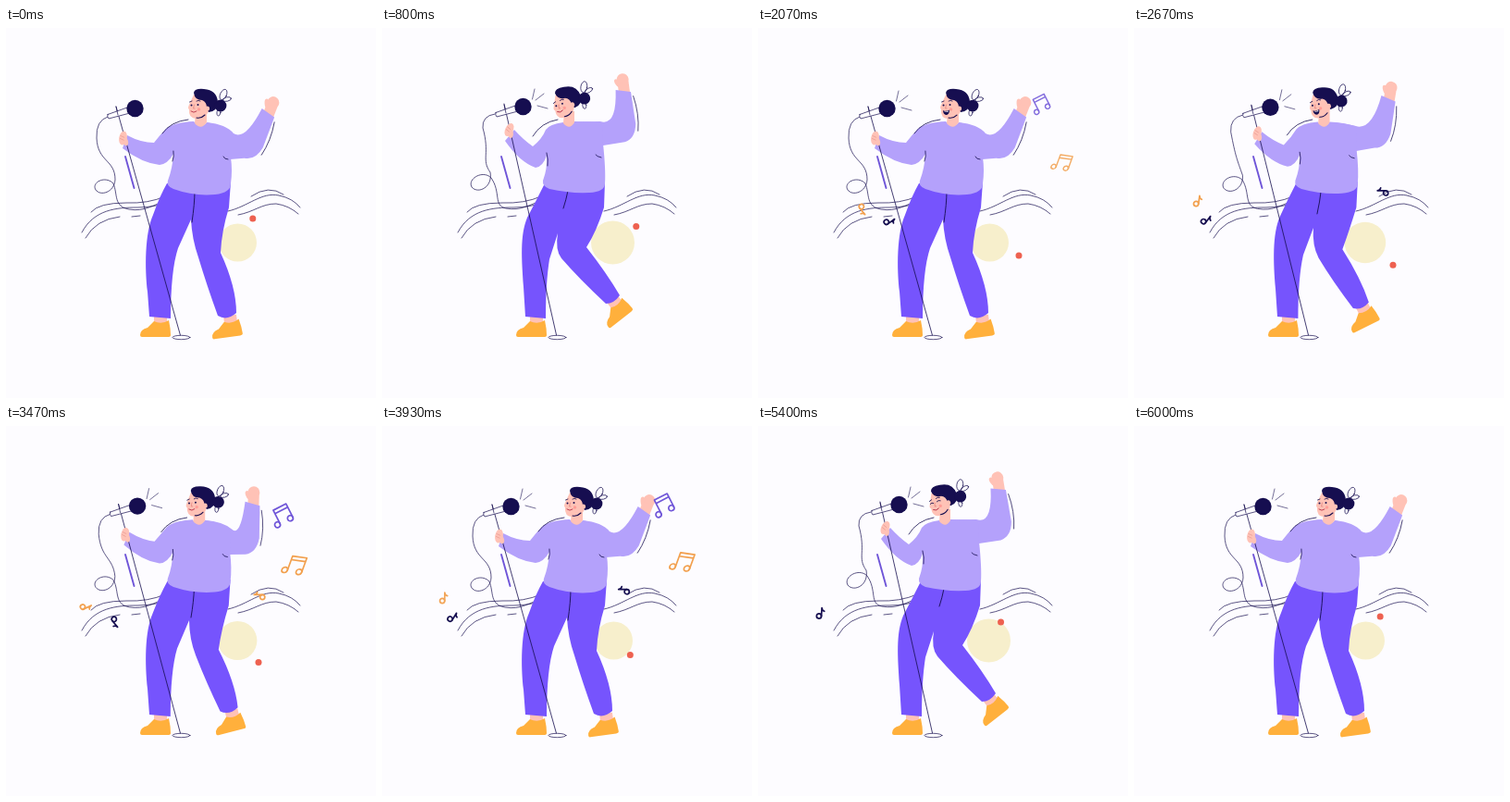
An HTML page that plays this animation: 400 by 400 pixels, repeating every 6070 ms.

```html
<!DOCTYPE html>
<html lang="en">
<head>
<meta charset="utf-8">
<title>Singer</title>
<style>
  html, body { margin: 0; width: 100%; height: 100%; overflow: hidden; background: #fdfcff; }
  svg { display: block; width: 100vw; height: 100vh; }
</style>
</head>
<body>
<svg id="stage" viewBox="0 0 400 400" fill="none" stroke-linecap="round" stroke-linejoin="round"></svg>
<script>
const LOOP = 6.07;
const INK = '#160e50', SKIN = '#ffc2b6', LILAC = '#b4a1fb', VIOLET = '#7654fd',
      ORANGE = '#ffb03c', NOTE_ORANGE = '#f2a04e', NOTE_VIOLET = '#6f55d8';

const stage = document.getElementById('stage');
const mix = (a, b, k) => a + (b - a) * k;
const ramp = (x, from, to) => Math.min(1, Math.max(0, (x - from) / (to - from)));
const smooth = (x, from, to) => { const k = ramp(x, from, to); return k * k * (3 - 2 * k); };
// Eases up from a to b, stays, eases down from c to d
const pulse = (t, a, b, c, d) => smooth(t, a, b) - smooth(t, c, d);

// Blend two paths that share the same commands
function morph(a, b, k) {
  const ends = b.match(/-?[\d.]+/g);
  let i = 0;
  return a.replace(/-?[\d.]+/g, n => mix(+n, +ends[i++], k).toFixed(2));
}

const fill = (d, color) => `<path d="${d}" fill="${color}"/>`;
const line = (d, width = 0.7, color = INK) => `<path d="${d}" stroke="${color}" stroke-width="${width}"/>`;
const dot = (x, y, r, color) => `<circle cx="${x}" cy="${y}" r="${r}" fill="${color}"/>`;
const oval = (x, y, rx, ry, turn, paint) =>
  `<ellipse cx="${x}" cy="${y}" rx="${rx}" ry="${ry}" transform="rotate(${turn} ${x} ${y})" ${paint}/>`;
const group = (x, y, turn, body, extra = '', opacity = 1) =>
  `<g transform="translate(${x} ${y}) rotate(${turn}) ${extra}" opacity="${opacity}">${body}</g>`;

const thin = `stroke="${INK}" stroke-width=".7"`;
const skin = `fill="${SKIN}"`;

const waves = line(`M92 199Q100 189 130 189Q154 190 172 182M82 221C95 196 120 194 142 194Q162 194 178 187
  M86 227Q97 207 123 204M136 204L145 203M265 182Q284 169 300 180
  M240 198C262 193 276 177 295 181Q310 184 318 194M251 202C268 199 276 190 292 190Q306 192 316 201`);

// A small note runs left along the staff lines, slowing down and tumbling
function singleNote(age, dark) {
  if (age < -0.1 || age > 1.95) return '';
  const x = 66 + 224 * (1 - Math.min(1, age / 1.7)) ** 2;
  const [low, climb] = dark ? [212, 35] : [196, 12];
  const y = low - climb * smooth(x, 110, 280) - 10 * (1 - ramp(x, 66, 88));
  const turn = 140 * ramp(x, 66, 110) - 230 * ramp(x, 125, 170);
  const color = dark ? INK : NOTE_ORANGE;
  return group(x, y, turn,
    `<circle cx="-1" cy="3" r="2.6" stroke="${color}" stroke-width="1.7"/>` +
    line('M1.6 3V-6Q2 -3 4.5 -2.5', 1.7, color), '', pulse(age, -.1, 0, 1.6, 1.95));
}
function singleNotes(t) {
  let notes = '';
  for (let i = 0; i < 3; i++)
    notes += singleNote(t - 1.15 - 1.13 * i, false) + singleNote(t - 1.36 - 1.23 * i, true);
  return notes;
}

const beamedNote = (x, y, turn, skew, color, size) => group(x, y, turn, `<g stroke="${color}" stroke-width="1.7">
    <circle cx="-8" cy="8" r="3"/><circle cx="7.500" cy="8" r="3"/>
    <path d="M-5 8V-8H10.500V8M-5 -4H10.500"/></g>`, `skewX(${skew}) scale(${size})`, size);

// Two beamed notes pop up twice, two seconds apart, and drift away
function beamedPair(t) {
  const age = (t - 1.1) % 2;
  if (t < 1.1 || t > 5) return '';
  const size = pulse(age, 0, .3, .9, 1.2), drift = age - .37;
  return beamedNote(297 + 12 * drift, 96 - 24 * drift, -27, 0, NOTE_VIOLET, size) +
         beamedNote(312 + 28 * drift, 149 - 8 * drift, 8, -12, NOTE_ORANGE, size);
}

const shoe = fill('M-16 7Q-16 1 -8 -1L-1 -8Q7 -4 15 -9Q17 0 17 7Q17 9 14 9H-14Q-16 9 -16 7Z', ORANGE);
const ankle = fill('M-1 -14H13V-5Q6 0 -1 -5Z', SKIN);

function legs(s) {
  const trousers = morph(
    'M174 168Q166 182 159 202C150 222 150 260 153 285L155 312L178 314Q178 262 186 238L200 207Q201 228 208 248Q217 278 229 311Q239 317 249 308Q249 280 232 243Q233 220 241 194L243 166Z',
    'M176 168Q166 188 157 205C149 224 151 250 153 280L155 312L177 314Q177 275 181 250L190 222Q187 240 194 249Q213 271 242 298Q251 298 257 289Q243 265 221 237Q232 220 240 194L241 166Z', s);
  return group(161, 325, 0, ankle + shoe) +
    group(mix(238, 253, s), mix(325.5, 308, s), mix(-8, -38, s), ankle + shoe) +
    fill(trousers, VIOLET) +
    line(morph('M204 176Q204 190 201 210', 'M201 176Q199 186 196 195', s), 0.9);
}

function microphone(s, rays) {
  return line(morph('M119 85L189 334', 'M132 82L189 334', s), 0.8) +
    `<ellipse cx="189.500" cy="334.500" rx="9.500" ry="2.200" ${thin} fill="#fdfcff"/>` +
    line('M129 139L138.500 173', 1.9, NOTE_VIOLET) +
    group(13 * s, -2 * s, 0,
      `<path d="M110 93.500L131 86L134 92L111 98Q109 96 110 93.500Z" ${thin} fill="#fdfcff"/>` +
      line('M119 85L121 94') + dot(139.5, 87, 9.2, INK) +
      `<g opacity="${rays}">${line('M149.500 79L152 68M153 80L162 73M155 86L166 89')}</g>`);
}

const cable = s => line(morph(
  'M110 96Q97 100 98 119C99 145 118 142 118 164C117 178 102 182 97 175C92 167 107 159 116 168C121 180 116 193 133 196C150 199 160 191 176 185',
  'M122 93Q108 95 109 108C117 136 107 142 117 156C120 172 104 180 97 172C92 163 109 153 118 162C129 178 120 192 134 195C150 198 160 191 176 185', s));

const leftHand = s => group(mix(126.5, 137.5, s), mix(119, 110, s), mix(10, 25, s),
  oval(0, 0, 4.3, 7.5, 0, skin) + oval(3, 3, 3, 5, -30, skin) + line('M-3 -2L1 -1M-3 1L1 2', .5, '#e08d86'));

function rightArm(s, lift) {
  const x = mix(264, 268, s), y = mix(141, 120.5, s), turn = mix(21.5, -9, lift), rad = turn * Math.PI / 180;
  const cos = Math.cos(rad), sin = Math.sin(rad);
  // Point in the forearm's own frame: across, along
  const at = (n, u) => `${(x + n * cos + u * sin).toFixed(2)} ${(y + n * sin - u * cos).toFixed(2)}`;
  const shoulder = morph('M217 102Q238 104 246 114', 'M208 102Q220 101 236 101', s);
  const armpit = morph('242 142L215 150', '239 127L215 140', s);
  return group(x, y, turn,
      oval(1, -65, 6.5, 6.8, 0, skin) + oval(-5, -62, 2.5, 5, -25, skin) + fill('M-5 -62H7V-48H-5Z', SKIN) +
      line('M10 -46Q14 -26 10 -8')) +
    fill(`${shoulder}Q${at(-12, 16)} ${at(-8, 55)}L${at(8, 51)}L${at(8.5, 16)}Q${at(6, 0)} ${at(-6, -2)}L${armpit}Z`, LILAC);
}

function sweater(s) {
  return fill(morph(
      'M203 101Q181 102 173 109Q166 116 160 124Q146 124 131 116L126 130Q147 146 166 148Q175 147 181 136Q180 152 175 165Q173 171 181 174Q203 182 226 180Q243 178 243 168Q245 154 243 140L243 113Q230 104 217 102Q210 110 203 101Z',
      'M196 102Q181 104 177 110Q173 120 163 128Q153 121 143 110L133 122Q149 145 166 151Q174 150 178 138Q179 152 174 165Q173 171 181 174Q203 179 224 178Q241 177 241 168Q242 154 239 125L238 102Q222 101 208 101Q203 110 196 102Z', s), LILAC) +
    line(morph('M181 133Q182 139 180 144M235 139Q236 142 240 142M169 114Q178 101 197 99',
               'M178 135Q180 142 179 149M231 137Q232 139 237 140M163 117Q172 102 190 99', s), 0.8);
}

function head(t, s) {
  const singing = (t > 1.2 && t < 3.1) || (t > 4.1 && t < 5);
  const blinking = (t > 1.2 && t < 1.95) || (t > 5 && t < 5.65);
  const tilt = 12 * pulse(t, 1.1, 1.4, 1.7, 2.1) - 16 * s;
  const eyes = blinking ? line('M198.500 83Q200.500 81.500 202 83M206 82.500Q208 81 210 82.500', .8)
                        : dot(200.5, 83.5, 1, INK) + dot(207.5, 83, 1, INK);
  const mouth = singing ? fill('M200 89Q203 91 207 88.500Q207 94 203 94Q200 93 200 89Z', blinking ? '#c93550' : INK) +
                          fill('M201 89.800Q203 91 206 89.500L205.500 90.800H202Z', '#fff')
                        : line('M200 90Q203 92.500 206 90', .9, '#b8344a');
  return fill(morph('M205 90H217V102Q211 111 204 103Z', 'M197 90H208V102Q203 111 196 103Z', s), SKIN) +
    `<g transform="translate(${-8 * s} ${-2.5 * s}) rotate(${tilt} 210 100)">` +
    fill('M203 72L198 83Q196 87 198 88Q197 98 206 98Q216 98 219 90L218 76Z', SKIN) +
    line('M206 97Q211 98 215 94', 1.1) +
    oval(235, 72, 3.4, 6, 25, thin) + oval(239, 77, 4.5, 2.2, -12, thin) + oval(230, 91, 2, 4, 10, thin) +
    fill('M203 70Q204 65 214 66Q228 67 229 80Q229 90 219 91L217 86Q217 80 212 78Q204 78 203 70Z', INK) +
    dot(232, 84, 6.4, INK) + dot(217.5, 87, 2.6, SKIN) + dot(208.5, 88, 1.7, '#ff9d97') +
    line('M198.500 80L201 79M206 79Q208 77.500 210 79', .8) + line('M203.500 83L202.500 87H204', .6, '#d9756f') +
    eyes + mouth + '</g>';
}

// The body leans three times per loop; the raised forearm follows a moment later
const lean = t => pulse(t, 0, .75, .95, 1.33) + pulse(t, 2.1, 3.1, 3.15, 3.6) + pulse(t, 4.2, 4.7, 5.4, 5.86);

function draw(t) {
  const sway = lean(t), lift = lean(t - .14);
  const rays = .85 * (pulse(t, 0, .4, 4.2, 4.6) + pulse(t, 4.7, 5, 6, LOOP));
  const orbit = 2 * Math.PI * t / LOOP;

  stage.innerHTML =
    dot(mix(250.5, 249.5, sway), 232, mix(20.5, 23.5, sway), '#f7efcc') +
    dot(272 + 10 * Math.sin(orbit - .55), 232 - 26 * Math.cos(orbit), 3.5, '#ee6150') +
    waves + singleNotes(t) + cable(sway) + legs(sway) +
    rightArm(sway, lift) + sweater(sway) + head(t, sway) +
    microphone(sway, rays) + leftHand(sway) + beamedPair(t);
}

const begin = performance.now();
function frame() {
  draw((performance.now() - begin) / 1000 % LOOP);
  requestAnimationFrame(frame);
}
frame();
</script>
</body>
</html>
```
